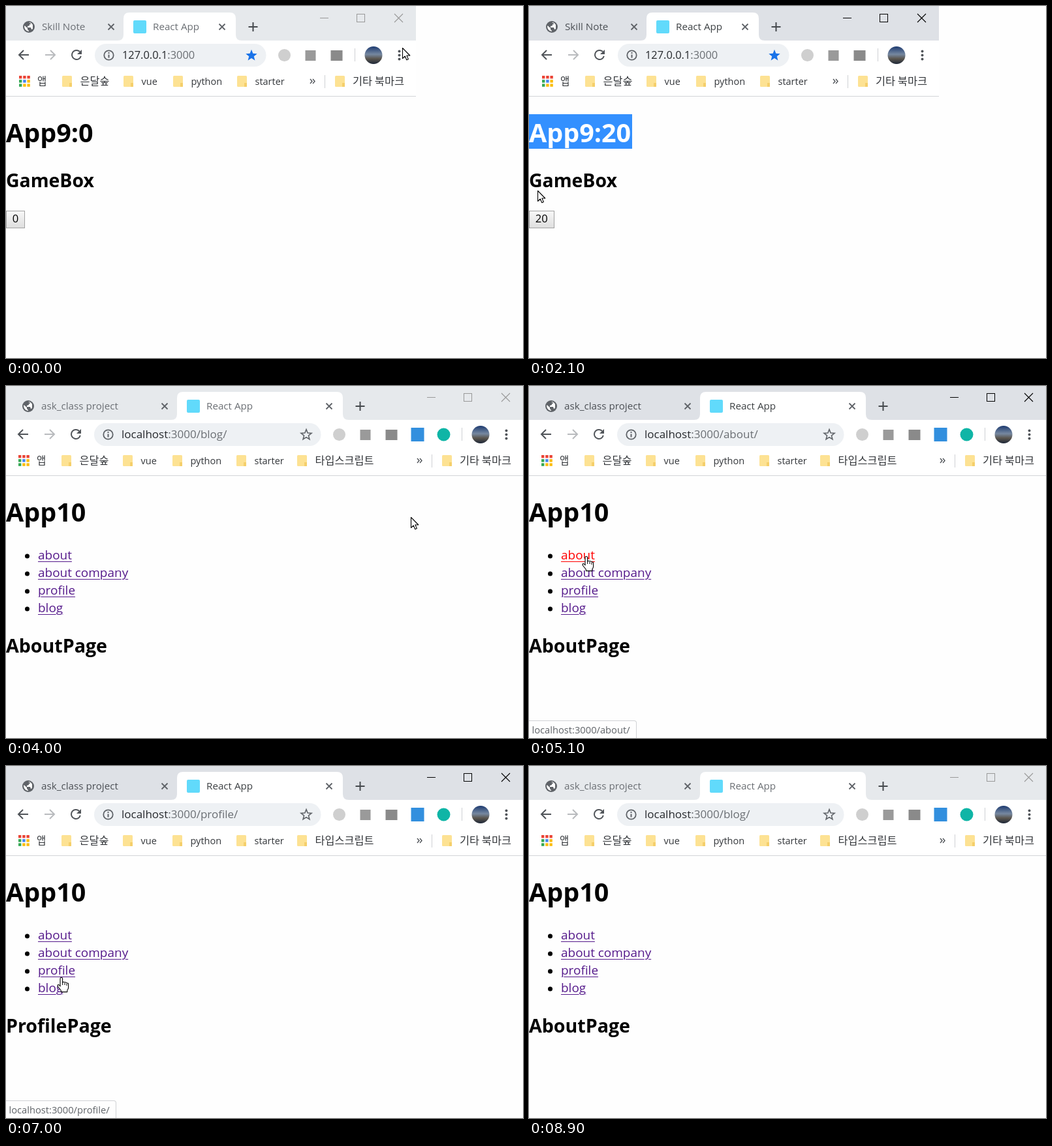
These frames come from a looping animation (792 by 540 pixels, 9 s). An HTML page with a canvas:

```html
<!DOCTYPE html>
<html lang="ko">
<head>
<meta charset="utf-8">
<title>Browser demo</title>
<style>
html, body { margin: 0; width: 100%; height: 100%; overflow: hidden; background: #fefefe; }
canvas { display: block; width: 792px; height: 540px; }
</style>
</head>
<body>
<canvas id="stage" width="792" height="540"></canvas>
<script>
const ctx = document.getElementById('stage').getContext('2d');
const LOOP = 9000, STEP = 100, SWITCH = 3900;
const SANS = '"Open Sans", "Noto Sans", "Noto Sans CJK KR", sans-serif';
const HANGUL = '"Noto Sans CJK KR", "Noto Sans CJK JP", sans-serif';
const LINKS = [['about', 'about/'], ['about company', 'about/company/'],
  ['profile', 'profile/'], ['blog', 'blog/']];
const HOST = 'localhost:3000/';
const GREY = '#5f6368';

// Pointer keys: time, x, y, shape
const POINTER_A = [
  [0, 607, 64, 'arrow'], [100, 560, 72, 'arrow'], [200, 390, 110, 'arrow'],
  [300, 188, 166, 'arrow'], [400, 172, 166, 'arrow'], [500, 113, 206, 'arrow'],
  [600, 133, 194, 'beam'], [1400, 133, 194, 'beam'], [1500, 156, 194, 'beam'],
  [1900, 3, 194, 'beam'], [2000, 8, 240, 'arrow'], [2200, 18, 325, 'arrow'],
  [2300, 20, 323, 'arrow'], [2400, 24, 321, 'arrow'], [2800, 24, 321, 'arrow'],
  [2900, 52, 305, 'arrow'], [3000, 82, 325, 'arrow'], [3100, 296, 227, 'arrow'],
  [3200, 586, 140, 'arrow'], [3300, 536, 140, 'arrow'], [3600, 612, 41, 'arrow'],
  [3700, 607, 64, 'arrow']];
const POINTER_B = [
  [3900, 700, 190, 'arrow'], [4300, 380, 235, 'arrow'], [4700, 120, 275, 'arrow'],
  [4900, 88, 261, 'hand'], [5300, 88, 261, 'hand'], [5800, 87, 288, 'hand'],
  [6000, 87, 288, 'hand'], [6200, 84, 341, 'hand'], [6300, 84, 341, 'hand'],
  [6500, 84, 317, 'hand'], [6900, 84, 317, 'hand'], [7300, 86, 346, 'hand'],
  [7700, 86, 350, 'hand'], [8000, 86, 350, 'hand'], [8100, 76, 372, 'arrow'],
  [8200, 0, 0, 'none']];

function pointerAt(keys, t) {
  let i = keys.length - 1;
  while (i > 0 && keys[i][0] > t) i--;
  const a = keys[i], b = keys[i + 1] || a;
  const k = b === a || b[3] === 'none' ? 0 : (t - a[0]) / (b[0] - a[0]);
  return { x: Math.round(a[1] + (b[1] - a[1]) * k), y: Math.round(a[2] + (b[2] - a[2]) * k), shape: a[3] };
}

function rect(x, y, w, h, color) {
  ctx.fillStyle = color;
  ctx.fillRect(x, y, w, h);
}
function roundRect(x, y, w, h, r, color) {
  ctx.fillStyle = color;
  ctx.beginPath();
  ctx.roundRect(x, y, w, h, r);
  ctx.fill();
}
function disc(x, y, r, color) {
  ctx.fillStyle = color;
  ctx.beginPath();
  ctx.arc(x, y, r, 0, Math.PI * 2);
  ctx.fill();
}
function line(color, width, ...strokes) {
  ctx.strokeStyle = color;
  ctx.lineWidth = width;
  ctx.beginPath();
  for (const points of strokes)
    points.forEach(([x, y], i) => i ? ctx.lineTo(x, y) : ctx.moveTo(x, y));
  ctx.stroke();
}
function text(str, x, y, size, color, weight = 400, family = SANS) {
  ctx.font = `${weight} ${size}px ${family}`;
  ctx.fillStyle = color;
  ctx.fillText(str, x, y);
  return ctx.measureText(str).width;
}
const cross = (x, y, r, color, width) =>
  line(color, width, [[x - r, y - r], [x + r, y + r]], [[x + r, y - r], [x - r, y + r]]);

function outlined(path, x, y) {
  ctx.save();
  ctx.translate(x, y);
  const shape = new Path2D(path);
  ctx.fillStyle = '#fff';
  ctx.strokeStyle = '#000';
  ctx.lineWidth = 1.1;
  ctx.lineJoin = 'round';
  ctx.fill(shape);
  ctx.stroke(shape);
  ctx.restore();
}

function globe(x, y) {
  disc(x, y, 9, GREY);
  ctx.save();
  ctx.translate(x, y);
  ctx.fillStyle = '#fff';
  ctx.fill(new Path2D('M-6.5-2L-2 2V4L0 6V7Q-6 6-7 0ZM0-7Q4-7 6-3L6 3L4 4L3 1H-2V-1L1-2V-4H3V-5Z'));
  ctx.restore();
}

function star(x, y, filled) {
  const outer = filled ? 9.2 : 8.4;
  ctx.beginPath();
  for (let i = 0; i < 10; i++) {
    const a = -Math.PI / 2 + i * Math.PI / 5, r = i % 2 ? outer * 0.43 : outer;
    ctx.lineTo(x + r * Math.cos(a), y + r * Math.sin(a));
  }
  ctx.closePath();
  if (filled) {
    ctx.fillStyle = '#1a73e8';
    ctx.fill();
  } else {
    ctx.strokeStyle = GREY;
    ctx.lineWidth = 1.6;
    ctx.stroke();
  }
}

function tabs(o) {
  const bar = o.active ? '#dee1e6' : '#e6e9ec';
  const ink = o.active ? '#3c4043' : '#6b6f74';
  rect(0, 0, o.width, 53, bar);
  const [l, r] = o.tab;
  ctx.fillStyle = '#fff';
  ctx.fill(new Path2D(`M${l - 9} 53Q${l} 53 ${l} 44V19Q${l} 10 ${l + 9} 10H${r - 9}Q${r} 10 ${r} 19V44Q${r} 53 ${r + 9} 53Z`));
  globe(35, 32);
  text(o.title, 55, 37, 15.2, o.active ? '#4b4f54' : '#6b6f74');
  cross(l - 19, 32, 4.5, GREY, 1.8);
  roundRect(l + 15, 22, 20, 20, 2, '#61dafb');
  text('React App', l + 45, 37, 15.2, ink);
  cross(r - 21, 32, 4.5, GREY, 1.8);
  const p = r + 26.5;
  line('#45494d', 2, [[p - 7, 32], [p + 7, 32]], [[p, 25], [p, 39]]);
  const c = o.active ? '#000' : '#999', w = o.width;
  line(c, 1, [[w - 147, 18.5], [w - 134, 18.5]]);
  ctx.strokeRect(w - 90.5, 12.5, 12, 12);
  cross(w - 26.5, 18.5, 6.5, c, 1.1);
}

function navButtons() {
  const arrow = (x, s, color) => line(color, 2, [[x - 7 * s, 75], [x + 8 * s, 75]],
    [[x, 68], [x - 7 * s, 75], [x, 82]]);
  arrow(27, 1, '#505459');
  arrow(68, -1, '#b9bbbe');
  ctx.strokeStyle = '#505459';
  ctx.lineWidth = 2;
  ctx.beginPath();
  ctx.arc(108, 75, 7, 0.25, 5.5);
  ctx.stroke();
  ctx.fillStyle = '#505459';
  ctx.fill(new Path2D('M116 67V74H109Z'));
}

function extension(i, x) {
  if (i === 0) disc(x, 75.5, 9.5, '#cfcfcf');
  else if (i === 1) rect(x - 8, 68, 16, 16, '#9a9a9a');
  else if (i === 2) rect(x - 9, 68, 18, 16, '#8a8a8a');
  else if (i === 3) rect(x - 10, 65, 20, 21, '#328fde');
  else disc(x, 75.5, 10, '#0fb5a6');
}

function toolbar(o) {
  const w = o.width, first = w - 81.5 - o.extensions * 40;
  rect(0, 53, w, 85, '#fff');
  rect(0, 138, w, 1, '#d3d5d8');
  navButtons();
  const end = first - 28;
  roundRect(136, 58, end - 136, 35, 17.5, '#eef1f4');
  ctx.strokeStyle = GREY;
  ctx.lineWidth = 1.8;
  ctx.beginPath();
  ctx.arc(157.5, 75.5, 7.2, 0, Math.PI * 2);
  ctx.stroke();
  rect(156.5, 74.5, 2, 5, GREY);
  rect(156.5, 71, 2, 2, GREY);
  const hostWidth = text(o.host, 178, 81, o.urlSize, '#26292d');
  text(o.path, 178 + hostWidth, 81, o.urlSize, '#6a6e73');
  star(end - 22.5, 76, o.starred);
  for (let i = 0; i < o.extensions; i++) extension(i, first + i * 40);
  rect(w - 94, 65, 1, 20, '#cfd1d4');
  const photo = ctx.createLinearGradient(0, 62, 0, 89);
  photo.addColorStop(0, '#1c3a70');
  photo.addColorStop(0.45, '#7688a0');
  photo.addColorStop(0.7, '#5b564e');
  photo.addColorStop(1, '#1d2738');
  disc(w - 65, 75.5, 13.5, photo);
  for (const dy of [-6, 0, 6]) disc(w - 25.5, 75.5 + dy, 2, '#505459');
}

function folder(x) {
  roundRect(x - 7, 107, 15, 17, 1.5, '#fde293');
  rect(x + 4, 118, 4, 6, '#f5cf6b');
}

function bookmarks(o) {
  const w = o.width, ink = '#33363a';
  const [red, green, blue, yellow] = ['#ea4335', '#34a853', '#4285f4', '#fbbc05'];
  [red, red, red, green, blue, yellow, green, yellow, yellow].forEach((c, i) =>
    rect(20 + i % 3 * 6.2, 107 + Math.floor(i / 3) * 6.2, 4.4, 4.4, c));
  text('앱', 48, 121, 15.5, ink, 400, HANGUL);
  const items = [[93, '은달숲'], [187, 'vue'], [263, 'python'], [361, 'starter'], [454, '타입스크립트']];
  for (const [x, label] of items.slice(0, o.bookmarks)) {
    folder(x);
    const latin = label < 'z';
    text(label, x + 20.5, 121, latin ? 14.5 : 16.3, ink, 400, latin ? SANS : HANGUL);
  }
  for (const x of [w - 162, w - 158])
    line('#505459', 1.4, [[x, 112], [x + 3, 115.5], [x, 119]]);
  rect(w - 140, 106, 1, 20, '#cfd1d4');
  folder(w - 117);
  text('기타 북마크', w - 97, 121, 16.4, ink, 400, HANGUL);
}

function browser(o) {
  tabs(o);
  toolbar(o);
  bookmarks(o);
}

function drawPointer({ x, y, shape }) {
  if (shape === 'arrow') {
    outlined('M.5.5V16.5L4.2 13L6.8 18.7L9.4 17.6L6.9 12H11.8Z', x, y);
  } else if (shape === 'hand') {
    outlined('M-2 14V2Q-2 .5-.2.5Q1.6.5 1.6 2V8Q3 6.5 5 8Q6.6 7.2 8 9Q10.6 8.6 10.6 11V16Q10.6 18 8.8 20V22.6H-.6V20.5L-5.4 14.5Q-6.4 12.4-5 11.6Q-3.6 11-2 14Z', x, y);
    line('#000', 1, [[x + 1.6, y + 8], [x + 1.6, y + 12]], [[x + 5, y + 9], [x + 5, y + 12]], [[x + 8, y + 10], [x + 8, y + 13]]);
  } else if (shape === 'beam') {
    rect(x, y - 8, 1, 16, '#333');
    rect(x - 3, y - 8, 7, 1, '#333');
    rect(x - 3, y + 8, 7, 1, '#333');
  }
}

function counterPage(t, pointer) {
  const count = t < 900 ? '0' : '20', title = 'App9:' + count;
  text(title, 0, 209, 39.5, '#000', 700);
  if (t >= 1600) {
    const left = t < 1900 ? pointer.x : 0;
    ctx.save();
    ctx.beginPath();
    ctx.rect(left, 166, 158 - left, 53);
    ctx.clip();
    rect(0, 166, 158, 53, '#3390ff');
    text(title, 0, 209, 39.5, '#fff', 700);
    ctx.restore();
  }
  text('GameBox', 0, 278, 28.4, '#000', 700);
  const w = count.length > 1 ? 39 : 29, pressed = t >= 2700 && t < 2900;
  const face = ctx.createLinearGradient(0, 314, 0, 341);
  face.addColorStop(0, pressed ? '#e2e2e2' : '#f8f8f8');
  face.addColorStop(1, pressed ? '#f0f0f0' : '#dedede');
  rect(0, 314, w, 27, '#a2a2a2');
  rect(1, 315, w - 2, 25, face);
  text(count, 9.7, 332, 16.6, '#000');
}

function link(label, y, color) {
  const w = text(label, 49, y, 18.95, color);
  rect(49, y + 3, w, 1, color);
  // A white halo opens the underline around descenders
  ctx.strokeStyle = '#fefefe';
  ctx.lineWidth = 2.4;
  ctx.strokeText(label, 49, y);
  text(label, 49, y, 18.95, color);
}

function statusBar(index, alpha) {
  const label = HOST + LINKS[index][1];
  ctx.save();
  ctx.globalAlpha = alpha;
  ctx.font = `14.7px ${SANS}`;
  const w = Math.round(ctx.measureText(label).width) + 16;
  roundRect(-1, 513, w, 30, [0, 4, 0, 0], '#d0d2d5');
  roundRect(-1, 514, w - 1, 30, [0, 3, 0, 0], '#fefefe');
  text(label, 4.5, 533, 14.7, '#5f6368');
  ctx.restore();
}

const between = (t, a, b) => t >= a && t < b;

function routeAt(t) {
  if (between(t, 5000, 6000)) return 0;
  if (between(t, 6000, 6800)) return 1;
  if (between(t, 6800, 8000)) return 2;
  return 3;
}

function routerPage(t, pointer, route) {
  text('App10', 0, 208, 39.5, '#000', 700);
  const hover = pointer.shape === 'hand' ? Math.floor((pointer.y - 248) / 27) : -1;
  const pressed = between(t, 5000, 5200) || between(t, 5900, 6000) ||
    between(t, 6700, 6800) || between(t, 7800, 8000);
  LINKS.forEach(([label], i) => {
    const y = 266 + i * 27;
    disc(32.5, y - 5, 3.5, '#000');
    link(label, y, pressed && i === hover ? '#f00' : '#551a8b');
  });
  text(route === 2 ? 'ProfilePage' : 'AboutPage', 0, 409, 28.6, '#000', 700);
  if (route === 1) text('AboutCompanyPage', 0, 474, 28.6, '#000', 700);
  if (hover >= 0) statusBar(hover, 1);
  else if (between(t, 8000, 8500)) statusBar(3, t < 8400 ? 1 : 0.4);
}

function draw(t) {
  rect(0, 0, 792, 540, '#fefefe');
  const first = t < SWITCH;
  const pointer = pointerAt(first ? POINTER_A : POINTER_B, t);
  if (first) {
    browser({ width: 628, active: t >= 800, tab: [180, 352], title: 'Skill Note', host: '127.0.0.1',
      path: ':3000', urlSize: 16.4, starred: true, extensions: 3, bookmarks: 4 });
    counterPage(t, pointer);
  } else {
    const route = routeAt(t);
    ctx.save();
    ctx.translate(-1, -1);
    browser({ width: 793, active: between(t, 5000, 8900), tab: [263, 517], title: 'ask_class project',
      host: 'localhost', path: ':3000/' + LINKS[route][1], urlSize: 17, starred: false,
      extensions: 5, bookmarks: 5 });
    ctx.restore();
    routerPage(t, pointer, route);
  }
  drawPointer(pointer);
}

function frame() {
  draw(Math.floor(performance.now() % LOOP / STEP) * STEP);
  requestAnimationFrame(frame);
}
frame();
</script>
</body>
</html>
```
